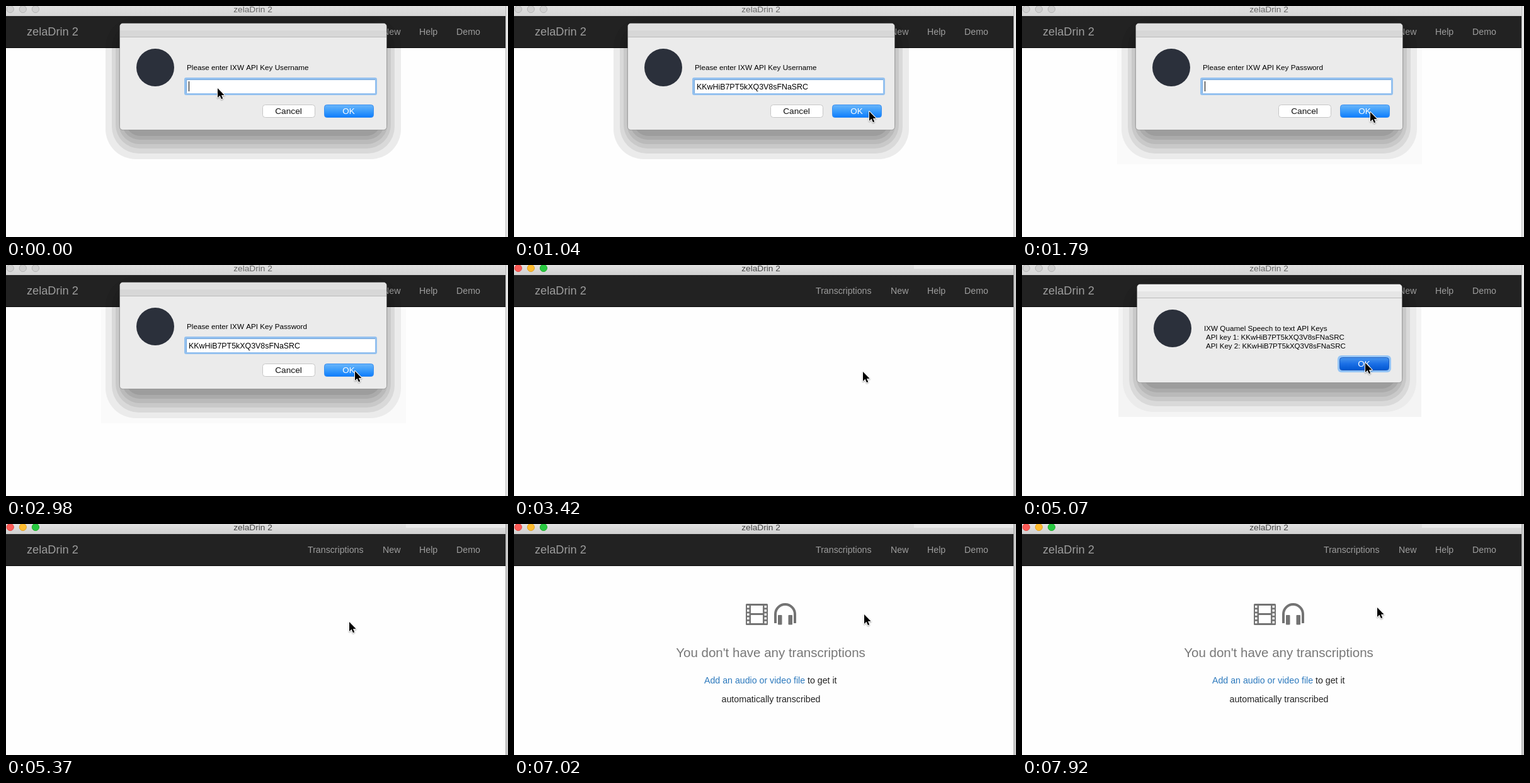
Recreate the animation shown at these times as an HTML page with a canvas. Size 797 by 368 pixels, loop 8000 ms.

```html
<!DOCTYPE html>
<html lang="en">
<head>
<meta charset="utf-8">
<title>Key setup</title>
<style>
html, body { margin: 0; width: 100%; height: 100%; overflow: hidden; background: #fefefe; }
canvas { display: block; width: 100%; height: 100%; }
</style>
</head>
<body>
<canvas id="stage" width="797" height="368"></canvas>
<script>
const ctx = document.getElementById('stage').getContext('2d');
const LOOP = 8000;
const APP = 'zelaDrin 2';
const KEY = 'KKwHiB7PT5kXQ3V8sFNaSRC';
const ASK = 'Please enter IXW API Key ';

const ASK_BOX = { x: 181, y: 28, w: 423, h: 169 };
const INFO_BOX = { x: 183, y: 31, w: 420, h: 156 };

// Each step changes only the properties it names.
const STEPS = [
  { t: 0, view: 'ask', label: 'Username', text: '', caret: true, pressed: false, halo: null, x: 336, y: 131 },
  { t: 300, caret: false },
  { t: 450, text: KEY },
  { t: 600, x: 341, y: 134 },
  { t: 750, x: 430, y: 149 },
  { t: 890, x: 540, y: 165 },
  { t: 1040, x: 564, y: 168 },
  { t: 1190, x: 560, y: 169 },
  { t: 1340, x: 554, y: 169 },
  { t: 1490, pressed: true },
  { t: 1640, label: 'Password', text: '', pressed: false, x: 553 },
  { t: 1790, caret: true, halo: '#fafafa' },
  { t: 1940, caret: false },
  { t: 2080, text: KEY },
  { t: 2680, x: 554 },
  { t: 3270, pressed: true },
  { t: 3420, view: 'blank', pressed: false, halo: null, y: 170 },
  { t: 3570, view: 'info', y: 169 },
  { t: 3720, halo: '#f4f4f4' },
  { t: 4020, x: 549, y: 161 },
  { t: 4170, x: 545, y: 156 },
  { t: 5070, pressed: true },
  { t: 5370, view: 'blank', pressed: false },
  { t: 5670, view: 'empty' },
  { t: 7020, x: 556, y: 144 },
  { t: 7170, x: 565, y: 133 },
  { t: 7920, x: 564 }
];

function stateAt(time) {
  return Object.assign({}, ...STEPS.filter(step => step.t <= time));
}

function rect(x, y, w, h, color) {
  ctx.fillStyle = color;
  ctx.fillRect(x, y, w, h);
}

function round(x, y, w, h, r, fill, line) {
  ctx.beginPath();
  ctx.roundRect(x, y, w, h, r);
  ctx.fillStyle = fill;
  ctx.fill();
  if (line) {
    ctx.strokeStyle = line;
    ctx.lineWidth = 1;
    ctx.stroke();
  }
}

function disc(x, y, r, fill, line) {
  round(x - r, y - r, 2 * r, 2 * r, r, fill, line);
}

function fade(y0, y1, ...colors) {
  const g = ctx.createLinearGradient(0, y0, 0, y1);
  colors.forEach((c, i) => g.addColorStop(i / (colors.length - 1), c));
  return g;
}

function write(str, x, y, size, color, align = 'left') {
  ctx.font = `${size}px "Liberation Sans", Arial, sans-serif`;
  ctx.textAlign = align;
  ctx.fillStyle = color;
  ctx.fillText(str, x, y);
}

function drawWindow(active) {
  rect(0, 0, 797, 368, '#fefefe');
  rect(0, 0, 793, 16, active ? fade(0, 16, '#e2e2e2', '#d0d0d0') : fade(0, 16, '#e0e0e0', '#d6d6d6'));
  if (active) rect(635, 0, 158, 6, '#e9e9e9');
  rect(793, 0, 1, 368, active ? '#a8a8a8' : '#bdbdbd');
  rect(794, 0, 3, 368, active ? '#cbcbcb' : '#e6e6e6');

  const lights = active ? ['#fc5b57', '#fdbb2d', '#28c840'] : ['#d0d0d0', '#d0d0d0', '#d0d0d0'];
  const rims = active ? ['#e2463f', '#dfa023', '#1dad2b'] : ['#b4b4b4', '#b4b4b4', '#b4b4b4'];
  lights.forEach((c, i) => disc(6.7 + i * 20.1, 5, 5.6, c, rims[i]));
  write(APP, 392, 10, 13.7, active ? '#444' : '#666', 'center');

  rect(0, 16, 793, 51, '#222');
  rect(0, 66, 793, 1, '#080808');
  write(APP, 33, 47, 18.2, '#9d9d9d');
  [['Transcriptions', 479], ['New', 598], ['Help', 656], ['Demo', 715]]
    .forEach(([name, x]) => write(name, x, 46, 14.2, '#9d9d9d'));
}

function drawShadow(box, halo) {
  const { x, y, w, h } = box;
  if (halo) rect(x - 30, 67, w + 61, y + h + 55 - 67, halo);
  const sides = [23, 13, 7, 2, -3, -9];
  const drops = [47, 38, 30, 23, 16, 10];
  const grays = [235, 217, 201, 186, 171, 157];
  const bands = (top, bottom, shade) => {
    ctx.save();
    ctx.beginPath();
    ctx.rect(0, top, 793, bottom - top);
    ctx.clip();
    sides.forEach((s, i) => {
      const y0 = y - 10 + i * 6;
      round(x - s, y0, w + 2 * s, y + h + drops[i] - y0, 48 - i * 5, shade(i));
    });
    ctx.restore();
  };
  bands(67, 368, i => `rgb(${grays[i]},${grays[i]},${grays[i]})`);
  bands(16, 67, () => 'rgba(0,0,0,0.07)');
}

function drawPanel(box, halo, light) {
  const { x, y, w, h } = box;
  drawShadow(box, halo);
  round(x - 0.5, y - 0.5, w + 1, h + 1, 5, '#ebebeb', 'rgba(0,0,0,0.22)');
  round(x, y, w, 21, [5, 5, 0, 0], light ? '#f0f0f0' : '#e0e0e0');
  rect(x, y + 11, w, 10, light ? '#e6e6e6' : '#d7d7d7');
  rect(x, y + 21, w, 1, '#bababa');
  disc(x + 56, y + 70, 30, '#2b303b');
}

function drawOk(x, y, w, h, pressed) {
  const fill = pressed
    ? fade(y, y + h, '#4a97ee', '#1a6fe6', '#0055cf')
    : fade(y, y + h, '#6cb6fa', '#3a9cfb', '#0a7afd');
  round(x + 0.5, y + 0.5, w - 1, h - 1, 4, fill, pressed ? '#1d5cc0' : '#3a8ff0');
  write('OK', x + w / 2 - 0.5, y + h / 2 + 4.5, 13.5, '#fff', 'center');
}

function drawAsk(s) {
  drawPanel(ASK_BOX, s.halo, false);
  write(ASK + s.label, 287, 102, 11.7, '#000');
  round(283, 114, 306, 28, 3, '#94c1ef');
  rect(286, 117, 300, 22, '#75a6da');
  rect(287, 118, 299, 21, '#fff');
  write(s.text, 290, 133, 12.4, '#000');
  if (s.caret) rect(290, 120, 1, 16, '#000');
  round(407.5, 157.5, 83, 20, 4, '#fff', '#c6c6c6');
  write('Cancel', 448.5, 172, 13.7, '#111', 'center');
  drawOk(505, 157, 79, 21, s.pressed);
}

function drawInfo(s) {
  drawPanel(INFO_BOX, s.halo, true);
  write('IXW Quamel Speech to text API Keys', 289, 105, 11.7, '#000');
  write('API key 1: ' + KEY, 292, 119, 11.5, '#000');
  write('API Key 2: ' + KEY, 292, 133, 11.5, '#000');
  round(501, 144, 85, 27, 6, '#94c4f5');
  drawOk(504, 147, 79, 21, s.pressed);
}

function drawFilm() {
  round(368, 127, 35, 34, 1.5, '#737373');
  rect(376, 130, 19, 12, '#fefefe');
  rect(376, 145, 19, 13, '#fefefe');
  for (let i = 0; i < 5; i++) {
    rect(370, 130 + i * 6.2, 3.5, 3.5, '#fefefe');
    rect(397.5, 130 + i * 6.2, 3.5, 3.5, '#fefefe');
  }
}

function drawHeadphones() {
  ctx.beginPath();
  ctx.moveTo(415, 158);
  ctx.lineTo(415, 143.5);
  ctx.arc(430.5, 143.5, 15.5, Math.PI, 0);
  ctx.lineTo(446, 158);
  ctx.strokeStyle = '#737373';
  ctx.lineWidth = 4;
  ctx.stroke();
  round(419, 145, 6.5, 15.5, 1, '#737373');
  round(435.5, 145, 6.5, 15.5, 1, '#737373');
}

function drawEmpty() {
  drawFilm();
  drawHeadphones();
  write("You don't have any transcriptions", 407.5, 212, 20.5, '#777', 'center');
  write('Add an audio or video file', 302, 254, 14.2, '#2c79bd');
  write('to get it', 466, 254, 14.2, '#222');
  write('automatically transcribed', 408, 284, 14.2, '#222', 'center');
}

function drawPointer(x, y) {
  const path = new Path2D('M0 0V15L3.5 11.8L6 17.3L8.3 16.2L6 11H10.7Z');
  ctx.save();
  ctx.translate(x, y);
  ctx.lineJoin = 'round';
  ctx.shadowColor = 'rgba(0,0,0,0.35)';
  ctx.shadowBlur = 2;
  ctx.shadowOffsetY = 1;
  ctx.strokeStyle = '#fff';
  ctx.lineWidth = 2;
  ctx.stroke(path);
  ctx.shadowColor = 'transparent';
  ctx.fillStyle = '#000';
  ctx.fill(path);
  ctx.restore();
}

const start = performance.now();

function frame() {
  const s = stateAt((performance.now() - start) % LOOP);
  drawWindow(s.view === 'blank' || s.view === 'empty');
  if (s.view === 'ask') drawAsk(s);
  if (s.view === 'info') drawInfo(s);
  if (s.view === 'empty') drawEmpty();
  drawPointer(s.x, s.y);
  requestAnimationFrame(frame);
}
frame();
</script>
</body>
</html>
```
